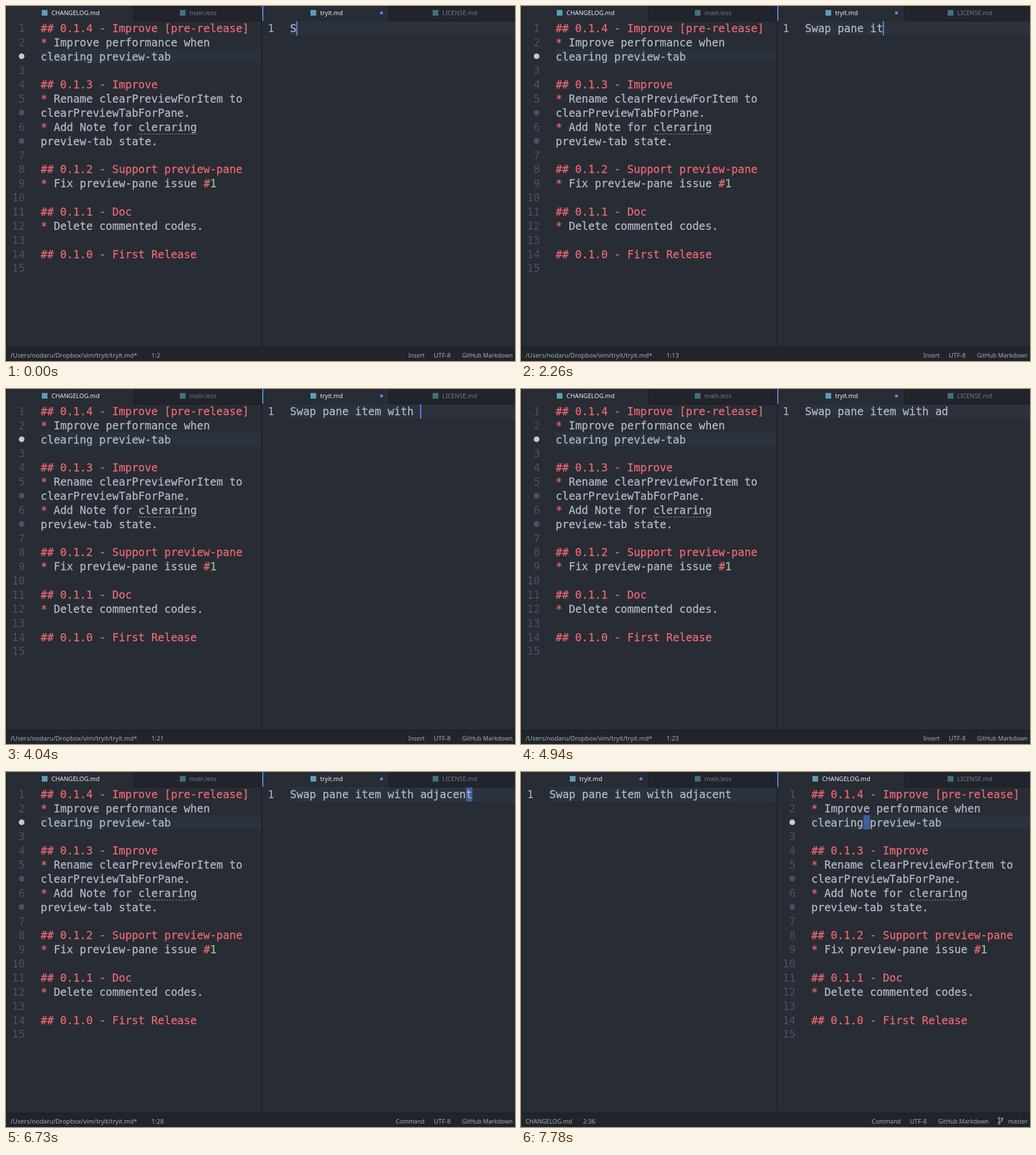
Recreate the animation shown at these times as an HTML page. Size 896x625 px, loop 8000 ms.

```html
<!DOCTYPE html>
<html lang="en">
<head>
<meta charset="utf-8">
<title>Swap panes</title>
<style>
  html, body { margin: 0; width: 100%; height: 100%; overflow: hidden; background: #282c34; }
  svg { display: block; width: 896px; height: 625px; }
  text { white-space: pre; }
  .code text { font: 19.05px "DejaVu Sans Mono", monospace; fill: #b1b8c5; stroke: #b1b8c5; stroke-width: .3px; }
  .code .head { fill: #ea6872; stroke: #ea6872; }
  .code .num { fill: #98c379; stroke: #98c379; }
  .code .gutter { fill: #495162; stroke: none; text-anchor: end; }
  .code .here { fill: #abb2bf; }
  .tab { font: 10.75px "Noto Sans", "Open Sans", sans-serif; fill: #737a88; }
  .tab.on { font-weight: 500; fill: #eceef2; }
  .status text { font: 500 10.4px "Noto Sans", "Open Sans", sans-serif; fill: #a3abba; }
  .status .path { font-size: 11px; }
  .end { text-anchor: end; }
</style>
</head>
<body>
<svg id="stage" viewBox="0 0 896 625"></svg>
<script>
const stage = document.getElementById('stage');
const CHAR = 11.47, ROW = 24.85, TOP = 26.6, BAND = 25;
const LINE = 'Swap pane item with adjacent';
const BORDER = '#181a1f', BLUE = '#568af2', BLOCK = '#3f5e9c', HIGHLIGHT = '#2c323c';

function add(parent, tag, attrs = {}, content) {
  const el = document.createElementNS('http://www.w3.org/2000/svg', tag);
  for (const key in attrs) el.setAttribute(key, attrs[key]);
  if (content !== undefined) el.textContent = content;
  parent.appendChild(el);
  return el;
}
const group = (parent, cls = '') => add(parent, 'g', { class: cls });
const rect = (parent, x, y, width, height, fill) =>
  add(parent, 'rect', { x, y, width, height, fill });
const text = (parent, x, y, str, cls = '') =>
  add(parent, 'text', { x, y, class: cls }, str);
const show = (el, on) => el.setAttribute('visibility', on ? 'visible' : 'hidden');
const rowTop = row => TOP + row * ROW;
const bandTop = row => Math.round(rowTop(row));
const baseline = row => rowTop(row) + 19.3;

// A row starting with ">" continues the line above.
const changelog = [
  '## 0.1.4 - Improve [pre-release]',
  '* Improve performance when',
  '>clearing preview-tab',
  '',
  '## 0.1.3 - Improve',
  '* Rename clearPreviewForItem to',
  '>clearPreviewTabForPane.',
  '* Add Note for cleraring',
  '>preview-tab state.',
  '',
  '## 0.1.2 - Support preview-pane',
  '* Fix preview-pane issue #1',
  '',
  '## 0.1.1 - Doc',
  '* Delete commented codes.',
  '',
  '## 0.1.0 - First Release',
  ''
];

function drawChangelog(parent, x, cursorCol) {
  const g = group(parent, 'code');
  const left = x + 61;
  let number = 0;
  rect(g, left, bandTop(2), 388, BAND, HIGHLIGHT);
  const cursor = cursorCol === undefined ? null
    : rect(g, left + cursorCol * CHAR, bandTop(2), CHAR, BAND, BLOCK);
  changelog.forEach((line, row) => {
    const y = baseline(row);
    if (line[0] === '>') {
      add(g, 'circle', { cx: x + 27.5, cy: rowTop(row) + 12.2, r: 5,
        fill: row === 2 ? '#c3c8d2' : '#495162' });
      text(g, left, y, line.slice(1));
      return;
    }
    text(g, x + 33.5, y, ++number, 'gutter');
    if (line[0] === '#') text(g, left, y, line, 'head');
    if (line[0] !== '*') return;
    const [body, issue] = line.split('#');
    text(g, left, y, '*', 'head');
    text(g, left + 2 * CHAR, y, body.slice(2));
    if (issue) {
      text(g, left + body.length * CHAR, y, '#', 'head');
      text(g, left + (body.length + 1) * CHAR, y, issue, 'num');
    }
  });
  const typo = left + 15 * CHAR;
  add(g, 'path', { d: `M${typo} 225.5h${9 * CHAR}`, stroke: '#e5656f', 'stroke-dasharray': '3 2' });
  return { g, cursor };
}

function drawNote(parent, x) {
  const g = group(parent, 'code');
  rect(g, x + 50, bandTop(0), x ? 396 : 400, BAND, HIGHLIGHT);
  text(g, x + 22.3, baseline(0), '1', 'gutter here');
  const block = rect(g, x + 50 + 27 * CHAR, bandTop(0), CHAR, BAND, BLOCK);
  const words = text(g, x + 50, baseline(0), LINE);
  const bar = rect(g, 0, bandTop(0), 2, BAND, BLUE);
  show(block, false);
  show(bar, false);
  return { g, block, words, bar };
}

function drawTab(parent, x, title, active) {
  rect(parent, x - 17, 7, 10, 10, active ? '#5a9fb5' : '#41717f');
  text(parent, x, 15.5, title, active ? 'tab on' : 'tab');
}

function drawFrame() {
  rect(stage, 0, 0, 896, 625, '#282c34');
  for (const [x, w] of [[225, 225], [675, 221]]) {
    rect(stage, x, 0, w, 26, '#21252b');
    rect(stage, x - 1, 26, w + 1, 1, BORDER);
    rect(stage, x - 1, 0, 1, 26, BORDER);
  }
  rect(stage, 450, 0, 1, 600, BORDER);
  rect(stage, 0, 0, 1, 600, BORDER);
  rect(stage, 0, 600, 896, 25, '#21252b');
  rect(stage, 0, 600, 896, 1, BORDER);
}

function drawModes(parent, shift) {
  const g = add(parent, 'g', { class: 'status', transform: `translate(${-shift})` });
  text(g, 753, 618.5, 'UTF-8', 'path');
  text(g, 892, 618.5, 'GitHub Markdown', 'end');
  return text(g, 737, 618.5, 'Command', 'end');
}

function drawBranch(parent) {
  const g = add(parent, 'g', { fill: 'none', stroke: '#9da5b4', 'stroke-width': 1.2 });
  for (const [cx, cy] of [[841.5, 609.7], [841.5, 619], [847, 610.7]])
    add(g, 'circle', { cx, cy, r: 1.5 });
  add(g, 'path', { d: 'M841.5 611.2v6.3M847 612.2q0 3-3 3.2q-2.5 .2-2.5 2' });
}

drawFrame();

const before = group(stage);
drawTab(before, 80, 'CHANGELOG.md', true);
drawTab(before, 553, 'tryit.md', true);
add(before, 'circle', { cx: 661, cy: 12, r: 2.6, fill: BLUE });
drawChangelog(before, 0);
const note = drawNote(before, 450);
const mode = drawModes(before, 0);
const beforeStatus = group(before, 'status');
text(beforeStatus, 8, 618.5, '/Users/nodaru/Dropbox/vim/tryit/tryit.md*', 'path');
const position = text(beforeStatus, 256, 618.5, '', 'path');

const after = group(stage);
const fadingTab = rect(after, 677, 0, 219, 27, '#272b32');
drawTab(after, 103, 'tryit.md', true);
drawTab(after, 530, 'CHANGELOG.md', true);
add(after, 'circle', { cx: 211, cy: 12, r: 2.6, fill: BLUE });
const afterStatus = group(after, 'status');
text(afterStatus, 8, 618.5, 'CHANGELOG.md');
text(afterStatus, 109, 618.5, '2:36', 'path');
text(afterStatus, 892, 618.5, 'master', 'end');
drawBranch(after);
drawModes(after, 68.5);
const content = group(after);
drawNote(content, 0);
const log = drawChangelog(content, 450, 8);

drawTab(stage, 323, 'main.less', false);
drawTab(stage, 768, 'LICENSE.md', false);
const accent = rect(stage, 451, 0, 2, 26, BLUE);

// [start ms, typed characters, cursor hidden]
const typing = [
  [0, 1], [150, 2], [320, 4], [470, 5],
  [920, 6], [1070, 7], [1220, 8], [1360, 9], [1510, 10],
  [1960, 10, true], [2110, 11], [2260, 12], [2400, 13], [2550, 14], [2700, 15],
  [3000, 16], [3150, 17], [3290, 18], [3740, 19], [4040, 20],
  [4340, 20, true], [4490, 20], [4640, 21], [4790, 22], [4940, 22, true],
  [5390, 23], [5540, 24], [5690, 25], [5830, 26], [5980, 27], [6130, 28]
];
const COMMAND = 6730, SWAP = 7480, FILL = 7630, SETTLE = 7780, LOOP = 8000;

function render(t) {
  const swapped = t >= SWAP, command = t >= COMMAND;
  before.style.display = swapped ? 'none' : '';
  after.style.display = swapped ? '' : 'none';
  accent.setAttribute('opacity', swapped && t < FILL ? 0.2 : 1);
  if (swapped) {
    content.style.display = t >= FILL ? '' : 'none';
    fadingTab.style.display = t < FILL ? '' : 'none';
    show(log.cursor, t >= SETTLE);
    return;
  }
  const [, count, hidden] = typing.findLast(step => step[0] <= t);
  note.words.textContent = LINE.slice(0, count);
  note.bar.setAttribute('x', Math.round(499.5 + count * CHAR));
  show(note.bar, !hidden && !command);
  show(note.block, command);
  mode.textContent = command ? 'Command' : 'Insert';
  position.textContent = '1:' + (command ? count : count + 1);
}

const start = performance.now();
function tick() {
  render((performance.now() - start) % LOOP);
  requestAnimationFrame(tick);
}
tick();
</script>
</body>
</html>
```
